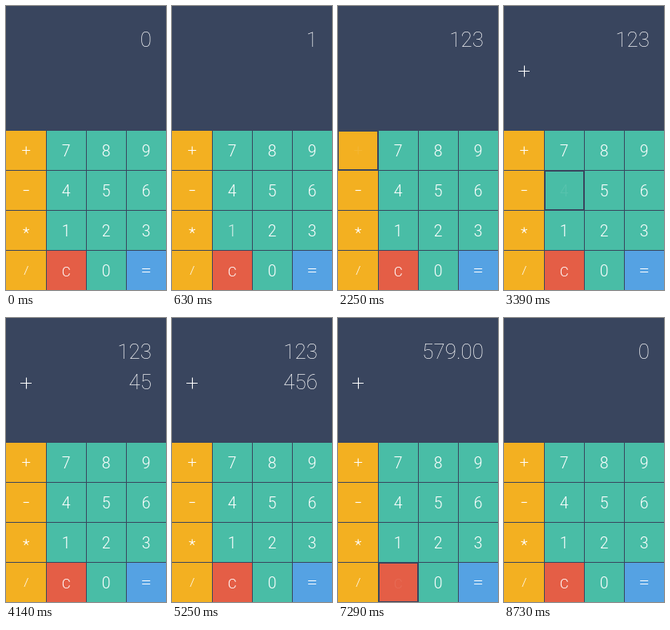
These frames come from a looping animation (200x355 px, 8760 ms). An HTML page:

```html
<!DOCTYPE html>
<html lang="en">
<head>
<meta charset="utf-8">
<title>Calculator</title>
<style>
  html, body { margin: 0; width: 100%; height: 100%; overflow: hidden; background: #39455e; }
  svg { display: block; width: 200px; height: 355px; }
  text { font-family: Roboto, Inter, sans-serif; fill: #fff; }
  .key { font-size: 19.5px; font-weight: 300; text-anchor: middle; }
  .num { font-size: 26px; font-weight: 200; text-anchor: end; }
  path { stroke: #fff; fill: none; }
</style>
</head>
<body>
<svg viewBox="0 0 200 355">
  <rect width="200" height="355" fill="#39455e"/>
  <text id="first" class="num" x="182" y="51"></text>
  <text id="second" class="num" x="182" y="89"></text>
  <path id="plus" d="M18 81.5H32M25.5 74.5V88.5" stroke-width="1.1"/>
  <g id="keys"></g>
</svg>
<script>
const LOOP = 8760, FADE = 350;
const $ = id => document.getElementById(id);
const colors = { op: '#f3b021', digit: '#49bda6', C: '#e45e46', '=': '#55a2e3' };
// Operator marks, relative to the key centre
const marks = {
  '+': 'M-5 0H5M0 -5V5',
  '-': 'M-3.5 0H3.5',
  '*': 'M0 0V-4M0 0L-3.8 -1.2M0 0L3.8 -1.2M0 0L-2.4 3.3M0 0L2.4 3.3',
  '/': 'M2.3 -5.5L-2.3 5.5',
  '=': 'M-5 -2H5M-5 2H5'
};
// key, finger down, finger up
const presses = [
  ['1', 350, 460], ['2', 930, 1030], ['3', 1480, 1590], ['+', 2190, 2310],
  ['4', 3380, 3490], ['5', 3700, 3790], ['6', 4400, 4510],
  ['=', 5740, 5860], ['C', 7230, 7350]
];

function add(parent, tag, attrs, label) {
  const el = document.createElementNS('http://www.w3.org/2000/svg', tag);
  for (const name in attrs) el.setAttribute(name, attrs[name]);
  if (label) el.textContent = label;
  return parent.appendChild(el);
}

const keys = {};
[...'+789-456*123/C0='].forEach((name, i) => {
  const col = i % 4, row = i >> 2;
  const x = col ? col * 50 + 1 : 0, y = 156 + row * 50;
  const w = col ? 49 : 50, h = 49;
  const g = add($('keys'), 'g');
  const fill = colors[name] || (col ? colors.digit : colors.op);
  add(g, 'rect', { x, y, width: w, height: h, fill });
  const edge = add(g, 'rect', {
    x: x + .5, y: y + .5, width: w - 1, height: h - 1,
    fill: 'none', stroke: '#39455e'
  });
  const cx = 25.5 + col * 50, cy = y + 25;
  const label = marks[name]
    ? add(g, 'path', {
        d: marks[name], transform: `translate(${cx - .3} ${cy - .5})`,
        'stroke-width': name === '/' ? .8 : 1.1
      })
    : add(g, 'text', { class: 'key', x: cx - .3, y: y + 32 }, name);
  if (name === 'C') label.style.fontSize = '17px';
  keys[name] = { edge, label };
});

function draw(t) {
  let first = '', second = '', op = false;
  for (const name in keys) {
    keys[name].edge.style.opacity = 0;
    keys[name].label.style.opacity = 1;
  }
  for (const [name, down, up] of presses) {
    if (t < down) break;
    const { edge, label } = keys[name];
    const back = Math.max(0, Math.min(1, (t - up) / FADE));
    label.style.opacity = .08 + .92 * back * (2 - back);
    edge.style.opacity = back < .3 ? 1 : 0;
    if (t < up) continue;
    if (name === '+') op = true;
    else if (name === '=') {
      first = (+first + +second).toFixed(2);
      second = '';
    } else if (name === 'C') {
      first = second = '';
      op = false;
    } else if (op) second += name;
    else first += name;
  }
  $('first').textContent = first || '0';
  $('second').textContent = second;
  $('plus').style.opacity = +op;
}

const start = performance.now();
function frame() {
  draw((performance.now() - start) % LOOP);
  requestAnimationFrame(frame);
}
frame();
</script>
</body>
</html>
```
